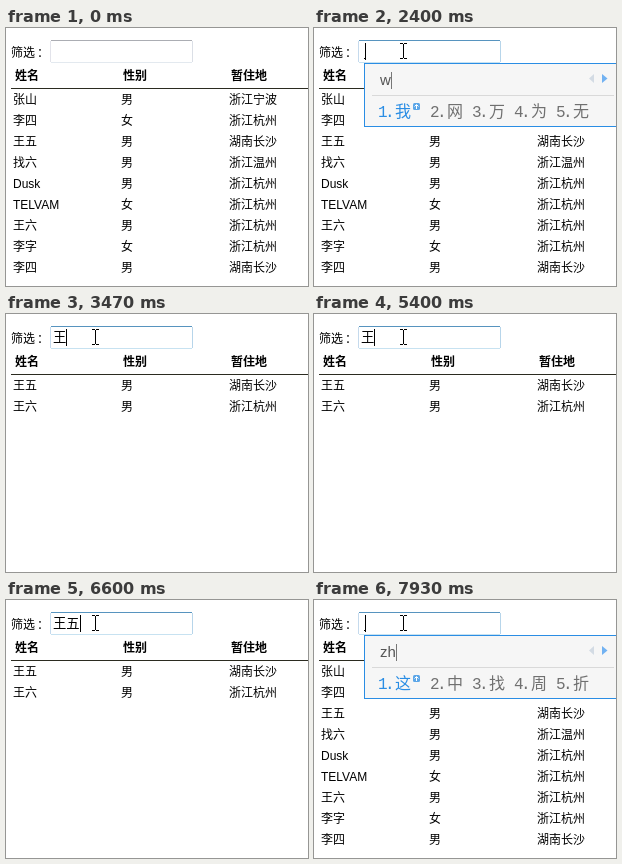
Recreate the animation shown at these times as an HTML page. Size 302 by 258 pixels, loop 8 s.

```html
<!DOCTYPE html>
<html lang="zh-CN">
<head>
<meta charset="utf-8">
<title>筛选</title>
<style>
html, body { margin: 0; width: 100%; height: 100%; overflow: hidden; background: #fff; }
svg { display: block; width: 302px; height: 258px; }
text { font: 12px "Liberation Sans", "Noto Sans CJK SC", "Noto Sans CJK", sans-serif; fill: #000; }
.head { font-weight: bold; }
.value { font-size: 13.333px; }
.pinyin { font-size: 15px; fill: #555; }
.candidate { font: 300 16px "Liberation Mono", "Noto Sans CJK SC", "Noto Sans CJK", monospace; fill: #707070; }
.candidate.first { fill: #2a8de4; }
.crisp { shape-rendering: crispEdges; }
</style>
</head>
<body>
<svg id="stage" viewBox="0 0 302 258">
  <text x="5 17 31" y="29">筛选：</text>
  <g id="field" fill="none">
    <path d="M44.5 13V34"/>
    <path d="M186.5 13V34"/>
    <path d="M45 34.5H186"/>
    <path d="M45 12.5H186"/>
  </g>
  <text id="value" class="value" x="47" y="28"></text>
  <rect id="caret" class="crisp" y="15" width="1" height="17"/>
  <rect class="crisp" x="5" y="60" width="297" height="1" fill="#2b2b20"/>
  <g id="table"></g>
  <g id="ime">
    <rect class="crisp" x="50" y="30" width="1" height="1"/>
    <rect id="panel" x="50.5" y="35.5" height="63" fill="#f6f6f6" stroke="#2a8de4"/>
    <rect id="divider" class="crisp" x="58" y="67" height="1" fill="#d9d9d9"/>
    <text id="pinyin" class="pinyin" x="66" y="57"></text>
    <rect id="imeCaret" class="crisp" y="44" width="1" height="17" fill="#777"/>
    <g id="pager">
      <path d="M-28 46v9l-5-4.5z" fill="#d3dbe4"/>
      <path d="M-20 46v9l5.5-4.5z" fill="#72b2f2"/>
    </g>
    <g id="badge">
      <rect x="99" y="75" width="7" height="7" rx="1.5" fill="#5ba6e8"/>
      <path d="M102.5 81v-4M100.5 78.5l2-2 2 2" fill="none" stroke="#fff"/>
    </g>
    <g id="candidates"></g>
  </g>
  <g id="pointer">
    <path id="arrow" d="M.5 .5V16l3.6-3.4 2.5 5.6 2.4-1-2.4-5.4h4.9z" fill="#fff" stroke="#000"/>
    <path id="beam" class="crisp" d="M-3-8h3v1h1v-1h3v1h-3v14h3v1h-3v-1h-1v1h-3v-1h3v-14h-3z"/>
  </g>
</svg>
<script>
const LOOP = 8000, BLINK = 530;
const COLUMNS = [7, 115, 223];
const people = [
  ['张山', '男', '浙江宁波'],
  ['李四', '女', '浙江杭州'],
  ['王五', '男', '湖南长沙'],
  ['找六', '男', '浙江温州'],
  ['Dusk', '男', '浙江杭州'],
  ['TELVAM', '女', '浙江杭州'],
  ['王六', '男', '浙江杭州'],
  ['李字', '女', '浙江杭州'],
  ['李四', '男', '湖南长沙']
];

// [time, typed text, caret x]
const typing = [
  [0, '', null], [1070, '', 47], [2400, '', 51], [3270, '王', 60], [5800, '王', 64],
  [6600, '王五', 74], [7130, '王', 60], [7270, '', 47], [7870, '', 51]
];
// [time, filter]
const filters = [[0, ''], [3470, '王'], [6800, '王五'], [7330, '王'], [7400, '']];
// [time, pinyin, candidates, has badge]
const compositions = [
  [0], [2400, 'w', '我网万为无', true], [2470, 'wa', '哇挖娃瓦袜', false],
  [2530, 'wan', '万完晚玩碗', false], [2600, 'wang', '王网往忘望', false], [3270],
  [5800, 'w', '我网万为无', true], [5870, 'wu', '无五物屋舞', false], [6600],
  [7870, 'z', '在这中最做', true], [7930, 'zh', '这中找周折', true]
];
// top, left, right, bottom
const idle = ['#abadb3', '#e2e3ea', '#dbdfe6', '#e3e9ef'];
const hover = ['#5794bf', '#c5daed', '#b7d5ea', '#c7e2f1'];
const focus = ['#3d7bad', '#b5cfe7', '#a4c9e3', '#b7d9ed'];
const borders = [[0, idle], [670, hover], [1070, focus], [1130, hover]];

const $ = id => document.getElementById(id);
const set = (node, attrs) => {
  for (const key in attrs) node.setAttribute(key, attrs[key]);
};
const show = (node, on) => set(node, { visibility: on ? 'inherit' : 'hidden' });
const current = (events, t) => events.findLast(event => event[0] <= t);

function addText(parent, text, attrs) {
  const node = document.createElementNS('http://www.w3.org/2000/svg', 'text');
  set(node, attrs);
  node.textContent = text;
  parent.append(node);
}

['姓名', '性别', '暂住地'].forEach((title, i) =>
  addText($('stage'), title, { x: COLUMNS[i] + 2, y: 52, class: 'head' }));
$('stage').append($('ime'), $('pointer'));

function drawTable(filter) {
  $('table').replaceChildren();
  people.filter(([name]) => name.includes(filter)).forEach((person, row) =>
    person.forEach((cell, i) =>
      addText($('table'), cell, { x: COLUMNS[i], y: 76 + 21 * row })));
}

function drawIme([, pinyin, choices, badge], caretX) {
  show($('ime'), !!pinyin);
  if (!pinyin) return;
  const extra = badge ? 10 : 0;
  const shift = caretX - 51;
  set($('ime'), { transform: `translate(${shift} ${shift ? 1 : 0})` });
  set($('panel'), { width: 247 + extra });
  set($('divider'), { width: 232 + extra });
  set($('pager'), { transform: `translate(${298 + extra} 0)` });
  show($('badge'), badge);
  $('pinyin').textContent = pinyin;
  set($('imeCaret'), { x: Math.round(66.3 + $('pinyin').getComputedTextLength()) });
  $('candidates').replaceChildren();
  [...choices].forEach((choice, i) => {
    const x = 65 + 42 * i + (i ? extra : 0);
    addText($('candidates'), `${i + 1}.${choice}`, {
      x: `${x - 1} ${x + 6} ${x + 16}`, y: 89, class: i ? 'candidate' : 'candidate first'
    });
  });
}

function drawPointer(t) {
  show($('pointer'), t >= 200);
  const progress = Math.min(1, Math.max(0, Math.floor((t - 200 + 4) / 66.5) / 8));
  const left = (1 - progress) ** 2;
  const x = Math.round(89 + 132 * left), y = Math.round(23 + 126 * left);
  set($('pointer'), { transform: `translate(${x} ${y})` });
  const inside = y < 34 && x < 187;
  show($('beam'), inside);
  show($('arrow'), !inside);
}

let lastFilter, lastIme;

function render(t) {
  const [since, text, caretX] = current(typing, t);
  $('value').textContent = text;
  show($('caret'), caretX !== null && Math.floor((t - since) / BLINK) % 2 === 0);
  set($('caret'), { x: caretX ?? 0 });

  const [top, left, right, bottom] = current(borders, t)[1];
  [left, right, bottom, top].forEach((stroke, i) => set($('field').children[i], { stroke }));

  const filter = current(filters, t);
  if (filter !== lastFilter) drawTable((lastFilter = filter)[1]);
  const ime = current(compositions, t);
  if (ime !== lastIme) drawIme(lastIme = ime, caretX);
  drawPointer(t);
}

const start = performance.now();
function tick() {
  render((performance.now() - start) % LOOP);
  requestAnimationFrame(tick);
}
tick();
</script>
</body>
</html>
```
